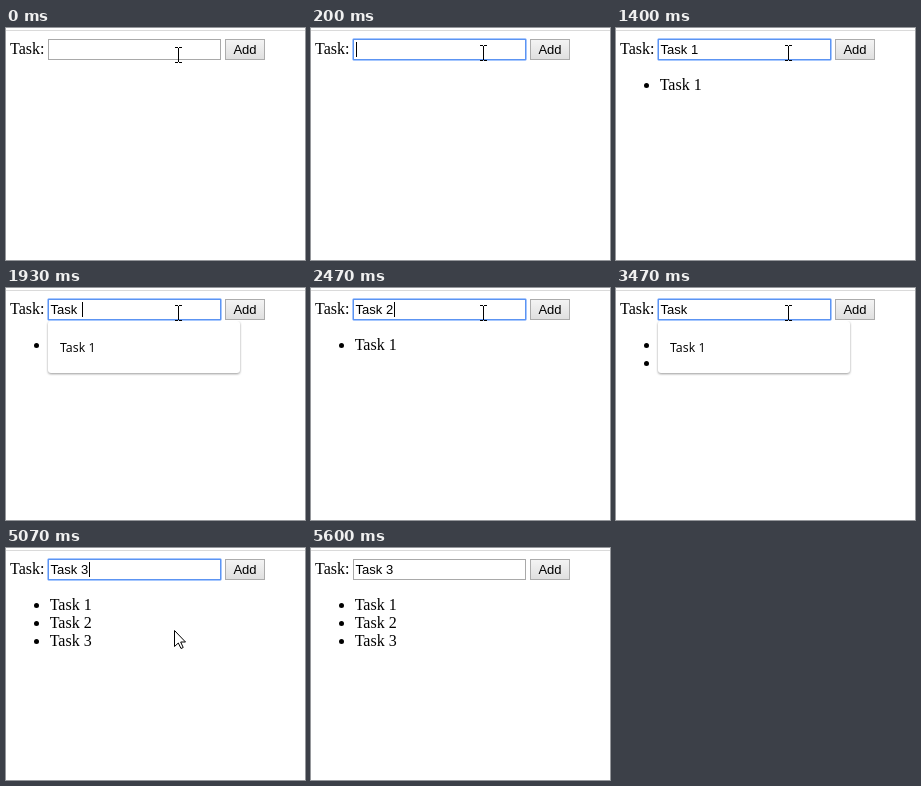
Write an HTML page that moves like this. It is 299 px wide and 232 px high and loops after 5.79 s.

```html
<!DOCTYPE html>
<html lang="en">
<head>
<meta charset="utf-8">
<title>Task list</title>
<style>
  html, body { margin: 0; width: 100%; height: 100%; overflow: hidden; background: #fff; }
  svg { display: block; width: 299px; height: 232px; }
  text { white-space: pre; fill: #000; }
  .serif { font: 16px "Liberation Serif", "Times New Roman", serif; }
  .sans { font: 13px "Liberation Sans", Arial, sans-serif; }
  .menu { font: 12.4px "Open Sans", "Noto Sans", sans-serif; }
  #popup rect { fill: #fff; filter: drop-shadow(0 1px 1px rgba(0, 0, 0, .4)); }
</style>
</head>
<body>
<svg viewBox="0 0 299 232">
  <defs>
    <linearGradient id="face" x2="0" y2="1">
      <stop offset="0" stop-color="#f4f4f4"/>
      <stop offset="1" stop-color="#dfdfdf"/>
    </linearGradient>
    <clipPath id="below"><rect y="33" width="299" height="199"/></clipPath>
  </defs>
  <rect width="299" height="232" fill="#fff"/>
  <rect y="2" width="299" height="1" fill="#dadada"/>
  <text class="serif" x="4" y="26">Task:</text>
  <g id="list"></g>

  <g id="popup" clip-path="url(#below)">
    <rect x="42" y="33" width="192" height="52" rx="3"/>
    <text class="menu" x="54" y="64">Task 1</text>
  </g>

  <rect x="42.5" y="11.5" width="172" height="20" fill="#fff" stroke="#a9a9a9"/>
  <g id="ring" fill="none">
    <rect x="41.5" y="10.5" width="174" height="22" rx="1.5" stroke="#a6c7fe"/>
    <rect x="42.5" y="11.5" width="172" height="20" stroke="#5c94f2"/>
  </g>
  <text id="value" class="sans" x="44.6" y="26"></text>
  <rect id="caret" y="14" width="1" height="15"/>

  <rect x="219.5" y="11.5" width="39" height="20" fill="url(#face)" stroke="#acacac"/>
  <text class="sans" x="239" y="26" text-anchor="middle">Add</text>

  <path id="beam" d="M169 .5h3m1 0h3M172.500 1v14M169 15.500h3m1 0h3" fill="none" stroke="#000"/>
  <path id="arrow" d="M.5.5V16.500L4.300 13 7 18.500 9.200 17.500 6.700 12H11.500Z" fill="#fff" stroke="#000"/>
</svg>
<script>
  const LOOP = 5790;
  const $ = id => document.getElementById(id);
  const show = (id, on) => $(id).setAttribute("visibility", on ? "visible" : "hidden");
  const move = (id, x, y) => $(id).setAttribute("transform", `translate(${x} ${y})`);

  // Caret offset after each typed character
  const CARET_X = [45, 52, 59, 66, 72, 76, 83];

  const START = { value: "", items: 0, focus: false, caret: false, popup: false, beam: 19, arrow: null };

  // Each entry changes only the listed parts of the state
  const EVENTS = [
    [70, { beam: 17 }],
    [200, { focus: true, caret: true }],
    [400, { value: "T", popup: true }],
    [460, { value: "Ta", popup: false }],
    [530, { value: "Tas" }],
    [600, { value: "Task" }],
    [730, { value: "Task " }],
    [930, { value: "Task 1" }],
    [1400, { items: 1, caret: false }],
    [1930, { value: "Task ", popup: true, caret: true }],
    [2470, { value: "Task 2", popup: false }],
    [2870, { items: 2 }],
    [3000, { caret: false }],
    [3470, { value: "Task ", popup: true }],
    [3530, { caret: true }],
    [3670, { value: "Task 3", popup: false }],
    [4130, { items: 3 }],
    [4200, { caret: false }],
    [4730, { caret: true }],
    [5070, { beam: null, arrow: [168, 82] }],
    [5130, { arrow: [167, 112] }],
    [5200, { arrow: [166, 160] }],
    [5270, { arrow: [165, 211], caret: false }],
    [5330, { arrow: null }],
    [5600, { focus: false }]
  ];

  $("list").innerHTML = [1, 2, 3].map(n => {
    const y = 44 + 18 * n;
    return `<g><circle cx="30.5" cy="${y - 4.5}" r="2.5"/>` +
      `<text class="serif" x="43.7" y="${y}">Task ${n}</text></g>`;
  }).join("");
  const rows = [...$("list").children];

  function draw(t) {
    const s = Object.assign({}, START, ...EVENTS.filter(e => e[0] <= t).map(e => e[1]));
    $("value").textContent = s.value;
    $("caret").setAttribute("x", CARET_X[s.value.length]);
    rows.forEach((row, i) => row.setAttribute("visibility", i < s.items ? "visible" : "hidden"));
    show("ring", s.focus);
    show("caret", s.caret);
    show("popup", s.popup);
    show("beam", s.beam !== null);
    show("arrow", s.arrow !== null);
    if (s.beam !== null) move("beam", 0, s.beam);
    if (s.arrow) move("arrow", ...s.arrow);
  }

  const begin = performance.now();
  function tick() {
    draw((performance.now() - begin) % LOOP);
    requestAnimationFrame(tick);
  }
  tick();
</script>
</body>
</html>
```
